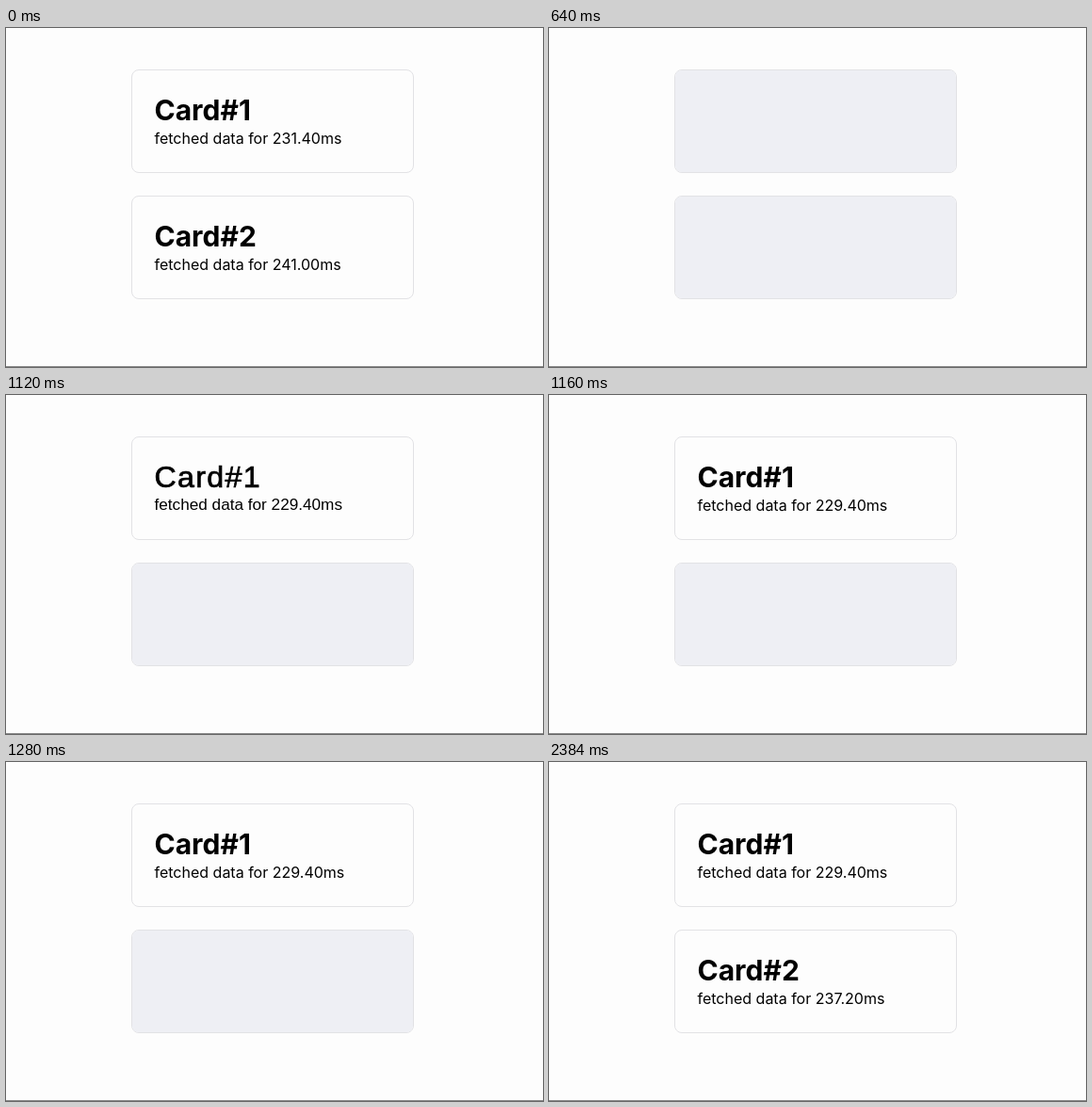
An HTML page that plays this animation: 570x360 px, repeating every 3040 ms.

```html
<!DOCTYPE html>
<html lang="en">
<head>
<meta charset="utf-8">
<title>Card loading</title>
<style>
  html, body { margin: 0; width: 100%; height: 100%; overflow: hidden; }
  body { position: relative; background: #fdfdfd; color: #000; font-optical-sizing: none; }
  body::after {
    content: ""; position: absolute; left: 0; right: 0; top: 359px;
    height: 1px; background: #8b8b8b;
  }
  .card {
    position: absolute; left: 133px; width: 300px; height: 110px;
    box-sizing: border-box; border: 1px solid #e2e2e5; border-radius: 8px;
  }
  .first { top: 44px; }
  .second { top: 178px; }
  .view { position: absolute; inset: 0; visibility: hidden; white-space: nowrap; }
  .view b, .view span { position: absolute; left: 23.5px; }
  .view b { top: 24px; font: 700 30px/36px Inter, sans-serif; font-optical-sizing: none; }
  .view span { top: 60px; font: 400 16px/24px Inter, sans-serif; font-optical-sizing: none; }
  .fallback b {
    font: 400 32.2px/36px "Liberation Sans", Arial, sans-serif;
    letter-spacing: 1.3px; -webkit-text-stroke: .7px #000;
  }
  .fallback span { top: 59px; font: 400 17.18px/24px "Liberation Sans", Arial, sans-serif; }
  .skeleton { background: #eeeff4; border-radius: 7px; }

  .view { animation: 3040ms step-end infinite; }
  .old { animation-name: old; }
  .first .skeleton { animation-name: load1; }
  .second .skeleton { animation-name: load2; }
  .fallback { animation-name: fallback; }
  .first .new { animation-name: new1; }
  .second .new { animation-name: new2; }

  /* 640, 1120, 1160 and 1400 ms of 3040 */
  @keyframes old { 0% { visibility: visible } 21.0526% { visibility: hidden } }
  @keyframes load1 { 21.0526% { visibility: visible } 36.8421% { visibility: hidden } }
  @keyframes load2 { 21.0526% { visibility: visible } 46.0526% { visibility: hidden } }
  @keyframes fallback { 36.8421% { visibility: visible } 38.1579% { visibility: hidden } }
  @keyframes new1 { 38.1579%, 100% { visibility: visible } }
  @keyframes new2 { 46.0526%, 100% { visibility: visible } }
</style>
</head>
<body>
  <div class="card first">
    <div class="view old"><b>Card#1</b><span>fetched data for 231.40ms</span></div>
    <div class="view skeleton"></div>
    <div class="view fallback"><b>Card#1</b><span>fetched data for 229.40ms</span></div>
    <div class="view new"><b>Card#1</b><span>fetched data for 229.40ms</span></div>
  </div>
  <div class="card second">
    <div class="view old"><b>Card#2</b><span>fetched data for 241.00ms</span></div>
    <div class="view skeleton"></div>
    <div class="view new"><b>Card#2</b><span>fetched data for 237.20ms</span></div>
  </div>
</body>
</html>
```
